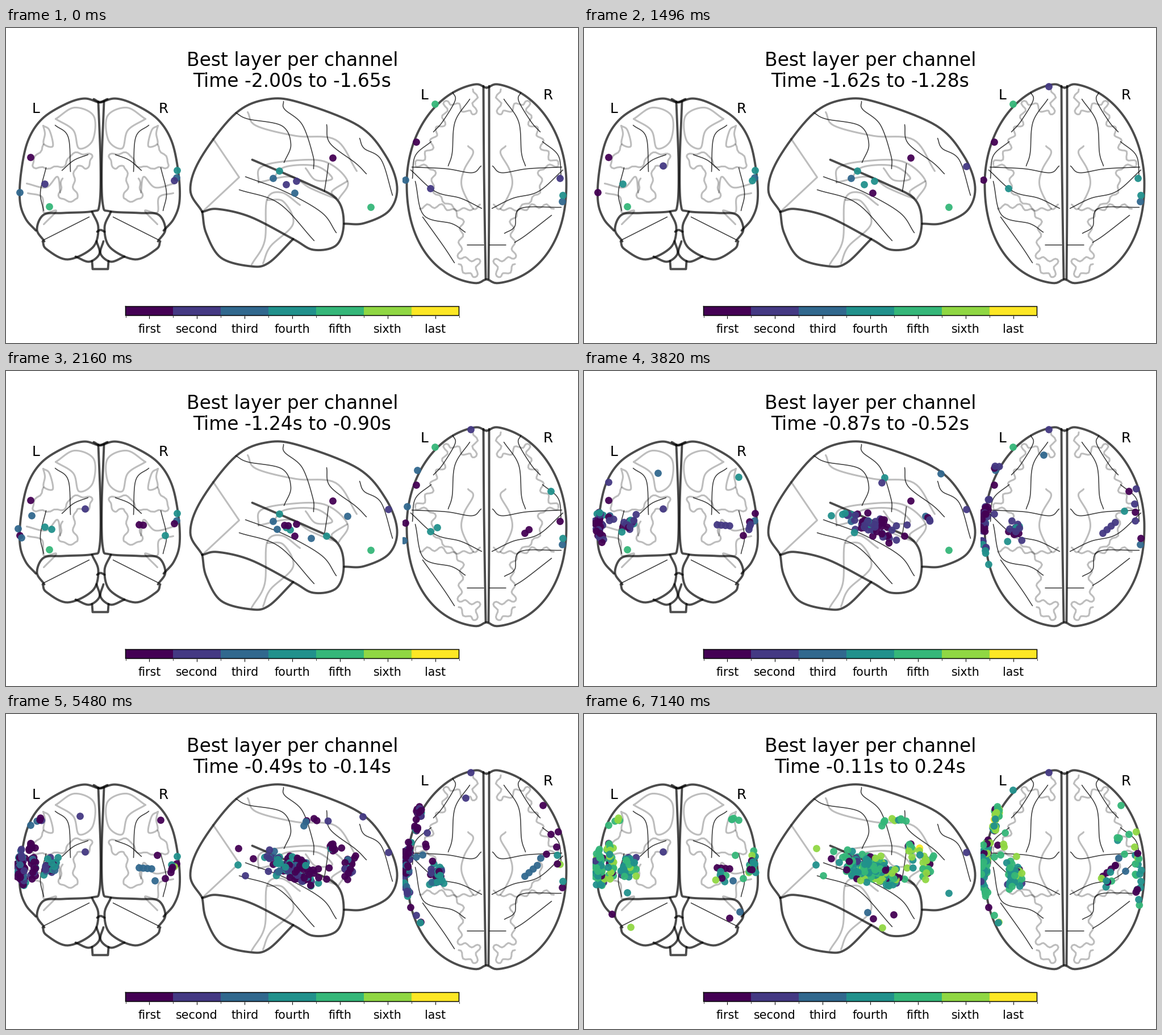
Write a matplotlib script that moves like this. It is 1007 by 556 pixels and loops after 8000 ms.

```python
import numpy as np
import matplotlib.pyplot as plt
from matplotlib.animation import FuncAnimation
from matplotlib.collections import LineCollection
from matplotlib.transforms import Bbox

W, H, DPI = 1007, 556, 128
PX = 72 / DPI
STEP, LOOP = 20, 8000
STARTS = [0] + [500 + 1660 * k for k in range(5)]
LAYERS = ["first", "second", "third", "fourth", "fifth", "sixth", "last"]
COLORS = plt.get_cmap("viridis", 7)(np.arange(7))

plt.rcParams["font.family"] = "DejaVu Sans"
fig = plt.figure(figsize=(W / DPI, H / DPI), dpi=DPI, facecolor="white")
ax = fig.add_axes([0, 0, 1, 1])
ax.axis("off")
# whole numbers are pixel centres
ax.set(xlim=(-0.5, W - 0.5), ylim=(H - 0.5, -0.5), autoscale_on=False)


# ---- brain outlines -------------------------------------------------------
bold, thin, gray = [], [], []


def smooth(p, n=10):
    """Catmull-Rom curve through the points."""
    q = np.vstack([2 * p[0] - p[1], p, 2 * p[-1] - p[-2]])
    a, b, c, d = (q[i:len(q) - 3 + i, None] for i in range(4))
    t = np.linspace(0, 1, n, endpoint=False)[None, :, None]
    s = 0.5 * (2 * b + (c - a) * t + (2 * a - 5 * b + 4 * c - d) * t ** 2
               + (3 * b - a - 3 * c + d) * t ** 3)
    return np.vstack([s.reshape(-1, 2), p[-1]])


def ripple(line, amp, length=24):
    """Fold a line sideways like a sulcus."""
    step = np.gradient(line, axis=0)
    size = np.hypot(*step.T)
    normal = step[:, ::-1] * [-1, 1] / size[:, None]
    return line + amp * np.sin(2 * np.pi * np.cumsum(size) / length)[:, None] * normal


def curve(group, *xy, flip=None, wave=0):
    """Add a curve, and its mirror image when flip gives the x sum."""
    line = smooth(np.array(xy, float).reshape(-1, 2))
    if wave:
        line = ripple(line, wave)
    group.append(line)
    if flip:
        group.append(line * [-1, 1] + [flip, 0])


def coronal():
    curve(bold, 163, 131, 137, 124, 104, 134, 63, 160, 38, 199, 26, 255,
          24, 305, 34, 336, 52, 357, flip=329)
    curve(bold, 154, 125, 165, 130, 178, 125)
    curve(bold, 162, 130, 166, 240, 164, 311, 152, 323, 100, 326, 66, 329,
          54, 355, 67, 376, flip=334)
    curve(bold, 151, 324, 162, 352, 152, 387, 108, 408, 71, 390, 64, 376,
          flip=335)
    curve(bold, 122, 403, 146, 412, 164, 398, 159, 376, flip=330)
    curve(bold, 160, 359, 166, 356, 173, 359)
    bold.append(np.array([(151, 411), (152, 425), (179, 425), (180, 411)]))

    curve(thin, 65, 374, 146, 333, flip=334)
    curve(thin, 86, 171, 109, 192, 113, 253, flip=337)
    curve(thin, 98, 251, 119, 233, 144, 223, flip=336)
    curve(thin, 70, 246, 60, 290, 66, 322, flip=342)

    curve(gray, 87, 160, 120, 140, 154, 155, 152, 198, 128, 212, 118, 180,
          87, 160, flip=332)
    curve(gray, 65, 172, 76, 180, 82, 208, 66, 204, 68, 186, 65, 172, flip=332)
    curve(gray, 67, 206, 46, 243, 100, 243, 115, 222, 150, 225, 140, 247,
          123, 244, 119, 280, 125, 302, 95, 300, 99, 265, wave=2, flip=332)
    curve(gray, 36, 274, 70, 281, 90, 262, 95, 290, flip=332)
    curve(gray, 38, 291, 63, 298, 66, 325, 88, 322, 66, 346, flip=332)


def sagittal():
    curve(bold, 345, 324, 324, 285, 343, 228, 404, 150, 462, 125, 520, 132,
          620, 172, 668, 225, 688, 280, 674, 322, 630, 344, 595, 345)
    curve(bold, 433, 232, 530, 274, 582, 302, 594, 345, 581, 383, 541, 391,
          505, 372, 430, 333, 372, 319, 345, 324)
    curve(bold, 345, 324, 352, 362, 378, 405, 430, 420, 462, 414, 505, 372)

    curve(thin, 404, 149, 425, 160, 485, 172, 501, 205, 489, 237)
    curve(thin, 488, 129, 490, 143, 521, 170, 540, 225, 541, 248)
    curve(thin, 564, 170, 570, 203, 615, 238, 634, 257)
    curve(thin, 622, 194, 630, 212, 660, 232, 680, 295)
    curve(thin, 567, 239, 565, 256, 560, 288)
    curve(thin, 421, 262, 490, 288, 555, 325, 581, 361)
    curve(thin, 410, 285, 480, 309, 542, 375)

    curve(gray, 425, 148, 440, 172, 510, 190, 580, 197, 617, 252)
    gray.append(np.array([(364, 195), (410, 263), (345, 324)]))
    curve(gray, 444, 272, 447, 246, 490, 235, 560, 235, 601, 270, 585, 302)
    curve(gray, 600, 270, 573, 288, 580, 300, 535, 282, 500, 262, 444, 272)
    curve(gray, 468, 268, 490, 245, 545, 243, 574, 265, 545, 268, 527, 247)
    curve(gray, 432, 417, 455, 375, 459, 302, 485, 290, 517, 312)
    curve(gray, 452, 415, 465, 385, 505, 345, 488, 306, 460, 303)


def axial():
    t = np.linspace(0, 2 * np.pi, 241)
    c, s = np.cos(t), np.sin(t)
    power = np.where(c > 0, 1, 0.91)
    x = 140.5 * np.sign(s) * abs(s) ** power
    notch = 8 * c * np.exp(-(x / 10) ** 2)
    y = 274 - 177 * np.sign(c) * abs(c) ** power + notch
    bold.append(np.c_[845.5 + x, y])
    curve(bold, 840, 102, 841, 250, 844, 442)
    curve(bold, 850, 102, 850, 300, 849, 442)

    curve(thin, 786, 113, 790, 128, 768, 165, 752, 183, flip=1692)
    curve(thin, 816, 125, 790, 165, 785, 220, 778, 243, flip=1692)
    curve(thin, 748, 200, 720, 225, 715, 265, flip=1692)
    curve(thin, 714, 245, 775, 248, 820, 255, 836, 243, flip=1692)
    curve(thin, 712, 250, 755, 288, 800, 300, 837, 318, flip=1692)
    curve(thin, 720, 270, 735, 330, 785, 345, 808, 360)
    curve(thin, 733, 333, 770, 385, 789, 414)
    curve(thin, 977, 316, 905, 318, 895, 350, 877, 362)
    curve(thin, 960, 330, 915, 365, 895, 378)
    curve(thin, 811, 382, 840, 382, flip=1690)

    curve(gray, 826, 108, 822, 150, 800, 140, 776, 130, 770, 165, 755, 185,
          745, 215, 721, 241, wave=5, flip=1692)
    curve(gray, 813, 208, 822, 220, 806, 250, 802, 280, 822, 318, 834, 311,
          flip=1692)
    curve(gray, 721, 241, 752, 250, 752, 285, 790, 318, 822, 318, wave=3,
          flip=1692)
    curve(gray, 728, 315, 770, 315, 800, 335, 800, 375, 800, 405, 830, 410,
          822, 438, 795, 418, wave=4, flip=1692)


for draw_view in (coronal, sagittal, axial):
    draw_view()
for z, (lines, alpha, width) in enumerate([(gray, 0.26, 3.1), (thin, 0.75, 1.6),
                                           (bold, 0.7, 3.9)], 1):
    ax.add_collection(LineCollection(lines, colors=[(0, 0, 0, alpha)], zorder=z,
                                     linewidths=width * PX, capstyle="round",
                                     joinstyle="round"), autolim=False)


# ---- text and colour bar --------------------------------------------------
def label(x, y, text, size):
    return ax.text(x, y, text, size=size * PX, ha="center", va="baseline")


label(503.5, 66, "Best layer per channel", 32.9)
title = label(503.5, 104, "", 32.9)
for x, y, side in [(52, 149, "L"), (277, 149, "R"),
                   (735.5, 125, "L"), (954, 125, "R")]:
    label(x, y, side, 24.7)

edges = np.linspace(210, 797, 8)
mids = (edges[:-1] + edges[1:]) / 2
ax.barh([499] * 7, np.diff(edges), 16, left=edges[:-1], color=COLORS)
ax.plot([210, 797, 797, 210, 210], [491, 491, 507, 507, 491], color="k",
        lw=1.5 * PX, solid_joinstyle="miter", snap=False)
ax.vlines(mids, 507, 512, color="k", lw=1.11 * PX)
ax.vlines(edges, 507, 510, color="k", lw=0.83 * PX)
for x, name in zip(mids, LAYERS):
    label(x, 538, name, 20.6)


# ---- electrodes: x, y, z and the best layer in each time window -----------
electrodes = [
    (76, 642, 315, "4444.3"), (68, 493, 275, "133004"),
    (24, 508, 290, "200004"), (300, 470, 264, "222203"),
    (301, 481, 251, "333033"), (296, 511, 269, "130.53"),
    (43, 575, 228, "000000"), (139, 673, 243, ".11111"),
    (45, 601, 255, "..2200"), (21, 477, 278, "..2113"),
    (27, 537, 294, "..2114"), (80, 500, 279, "..3113"),
    (280, 564, 290, "..3004"), (130, 628, 180, "...21."),
    (272, 529, 187, "...304"), (43, 524, 196, "...124"),
    (33, 435, 254, "...300"), (51, 409, 236, "....05"),
    (50, 408, 265, "....33"), (43, 421, 284, "....14"),
    (266, 615, 249, "....04"), (262, 522, 294, "....22"),
    (274, 499, 349, ".....2"), (256, 509, 360, ".....0"),
    (49, 545, 353, ".....0"), (82, 525, 376, ".....5"),
]
# depth electrode with four contacts
electrodes += [(234 + 7.3 * i, 490 + 6.4 * i, 271 + 0.6 * i,
                ("..0" if i < 2 else "...") + "120"[i < 2:])
               if i >= 2 else
               (234 + 7.3 * i, 490 + 6.4 * i, 271 + 0.6 * i, "..0120")
               for i in range(4)]

rng = np.random.default_rng(12)
# layer weights at the back and at the front of the brain
MIX = {3: ([.20, .50, .00, .30, 0, 0, 0], [.50, .40, .05, .05, 0, 0, 0]),
       4: ([.15, .25, .25, .35, 0, 0, 0], [.70, .15, .05, .10, 0, 0, 0]),
       5: ([.12, .04, .01, .38, .42, .03, 0], [.08, 0, 0, .22, .37, .31, .02])}


def codes(y, start):
    front = np.clip((y - 450) / 130, 0, 1)
    picks = ""
    for k in range(start, 6):
        back, fore = np.array(MIX[k])
        picks += str(rng.choice(7, p=back + (fore - back) * front))
    return "." * start + picks


def shore(y):
    """Left edge of the cortex seen from the front."""
    return 24 + 0.0021 * (y - 495) ** 2


def cluster(n, start, centre, spread, slope=0.0):
    """Electrodes around a centre; x of None follows the left surface."""
    for dx, dy, dz in np.clip(rng.normal(size=(n, 3)), -1.9, 1.9) * spread:
        x, y, z = centre
        x = shore(y + dy) if x is None else x
        yield x + dx, y + dy, z + dz + slope * dy, codes(y + dy, start)


# temporal surface and insula fill up window by window
for start, surface, deep in [(3, 30, 14), (4, 34, 12), (5, 34, 16)]:
    electrodes += cluster(surface, start, (None, 509, 273), (3, 25, 11), 0.3)
    electrodes += cluster(deep, start, (78, 492, 270), (7, 13, 9))
electrodes += cluster(4, 3, (None, 456, 253), (2, 6, 2))
electrodes += cluster(3, 3, (46, 608, 261), (3, 6, 3))
electrodes += cluster(4, 3, (293, 538, 268), (3, 16, 6))
electrodes += cluster(14, 4, (49, 606, 270), (3, 6, 11))
electrodes += cluster(9, 4, (44, 577, 231), (2, 7, 8))
electrodes += cluster(4, 4, (56, 540, 184), (4, 14, 7))
electrodes += cluster(7, 5, (45, 585, 254), (2, 9, 10))
electrodes += cluster(3, 5, (261, 553, 184), (4, 4, 1))
electrodes += cluster(12, 5, (296, 495, 264), (3, 32, 12))
electrodes += cluster(6, 5, (241, 482, 288), (5, 8, 6))


def window(k):
    shown = [e for e in electrodes if e[3][k] != "."]
    x, y, z = np.array([e[:3] for e in shown], float).T
    views = [np.c_[x, z], np.c_[y, z + 1], np.c_[x + 679, 776 - y]]
    start = -2 + 0.378 * k
    text = f"Time {start:.2f}s to {start + 0.346:.2f}s"
    return text, views, COLORS[[int(e[3][k]) for e in shown]]


# contacts that are silent early on still need one code per window
electrodes = [(*e[:3], e[3].rjust(6, ".")) for e in electrodes]
windows = [window(k) for k in range(len(STARTS))]
dots = []
for left, right in [(15, 315), (315, 698), (698, 993)]:
    s = ax.scatter([], [], s=(12.8 * PX) ** 2, alpha=0.95, lw=0, zorder=5)
    s.set_clip_box(Bbox([[left, 0], [right, H]]))
    dots.append(s)


def update(i):
    k = np.searchsorted(STARTS, i * STEP, side="right") - 1
    text, views, colors = windows[k]
    title.set_text(text)
    for s, xy in zip(dots, views):
        s.set_offsets(xy)
        s.set_facecolor(colors)
    return [title, *dots]


anim = FuncAnimation(fig, update, frames=LOOP // STEP, interval=STEP,
                     repeat=True, repeat_delay=0)
plt.show()
```
